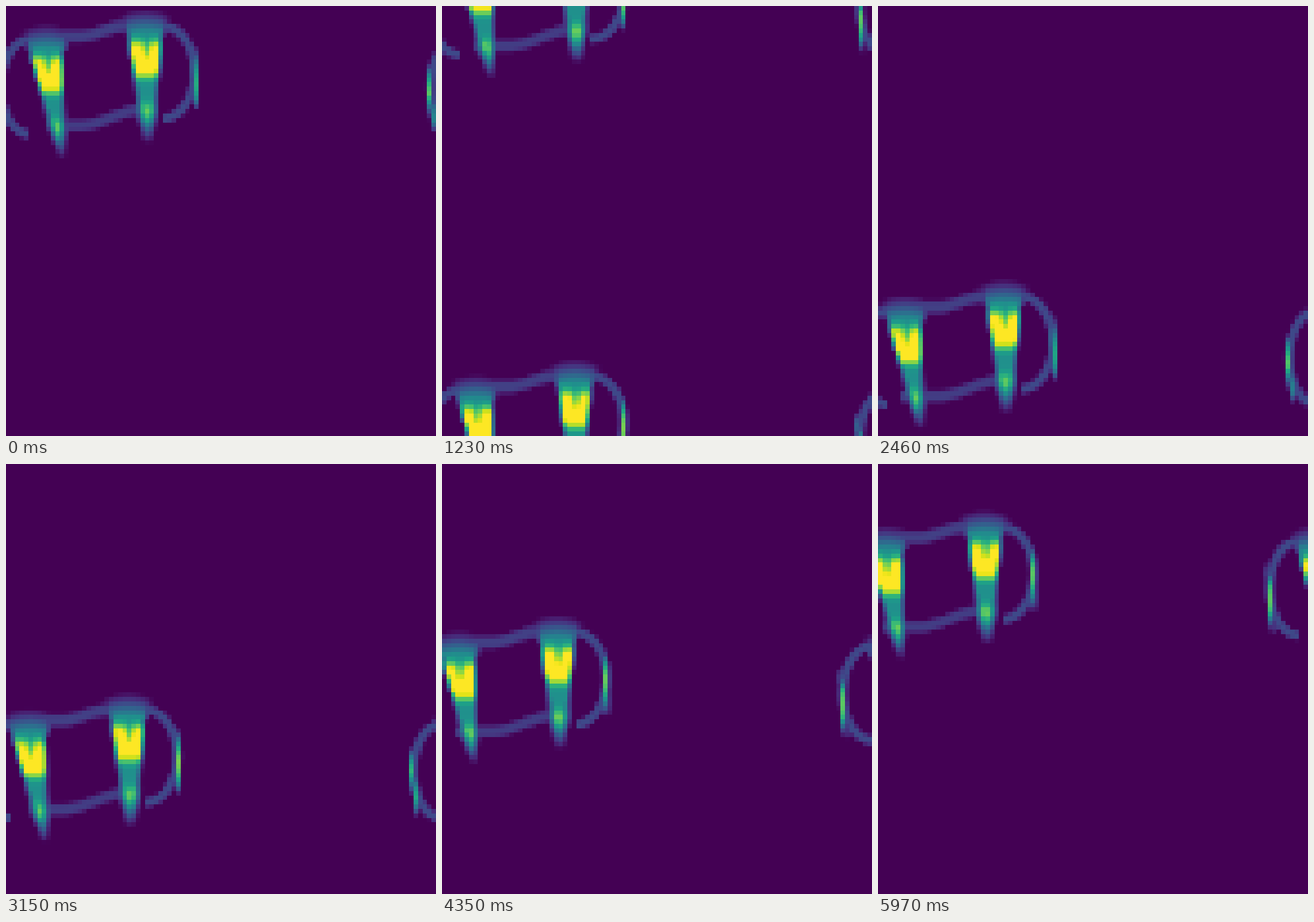
Recreate the animation shown at these times as a matplotlib script. Size 748 by 748 pixels, loop 6000 ms.

```python
import numpy as np
import matplotlib.pyplot as plt
from matplotlib.animation import FuncAnimation

SIZE, CELLS, FRAMES, STEP = 748, 96, 200, 30
VX, VY = -0.0368, -0.434  # drift in cells per frame


def unit(t):
    return np.clip(t, 0, 1)


def smooth(t):
    t = unit(t)
    return t * t * (3 - 2 * t)


def bump(t, power=2):
    return np.exp(-np.abs(t) ** power)


def fang(u, v, top, left, right, lean_l, lean_r):
    """Tapering body: domed cap, hot core with a notch, small foot and tail."""
    h = v - top
    mid = (left + right) / 2
    rise = unit((h - .04 * (u - mid) ** 2) / 5.5)
    level = .5 * rise * unit((30.2 - h) / 5)
    level += .62 * bump((h - 11.4) / 4.1, 4) + .27 * bump((h - 23) / 1.8)

    flare = 1.8 * unit(1 - (h / 6.5) ** 2)
    fall = np.maximum(h - 7, 0)
    lo = left + lean_l * fall - flare
    hi = right + lean_r * fall + flare
    soft = 1.4 + 1.6 * unit(1 - h / 7) + .8 * bump((h - 23) / 3)

    level -= .32 * bump(u - mid - .3) * bump((h - 9.3) / 2.2)
    return level * unit((u - lo) / soft + .5) * unit((hi - u) / soft + .5)


def strand(dist, level, width):
    return level * unit(1.1 * (1 - (dist / width) ** 2))


def end_cap(u, v, cx, cy, rx, ry, side):
    """Half an ellipse, open towards the middle of the body."""
    du, dv = (u - cx) / rx, (v - cy) / ry
    r = np.hypot(du, dv) + 1e-9
    dist = (r - 1) * r / np.hypot(du / rx, dv / ry).clip(1e-9)
    return strand(dist, .22, 1.35) * (side * du > 0)


def wall(u, v, x, lean, mid, half, level):
    """Bright stretch of a cap, about one cell wide."""
    dist = np.abs(u - x - lean * (v - mid))
    return level * unit(1 - ((v - mid) / half) ** 2) * unit(1.5 - 2 * dist)


def creature(u, v):
    between = (u > 8) & (u < 31)
    upper = 6.3 - 2.3 * smooth((u - 16) / 10)
    lower = 26.2 - 3.6 * smooth((u - 16) / 14)
    parts = [
        fang(u, v, 3.5, 5, 12.15, .28, .02),
        fang(u, v, 0, 27, 34.2, .14, -.09),
        strand(v - upper, .19, 1.8) * between,
        strand(v - lower, .18, 1.7) * between,
        end_cap(u, v, 4.8, 17.6, 6.5, 10.5, -1),
        end_cap(u, v, 34.5, 14.3, 7.1, 10.3, 1),
        wall(u, v, -1.67, .08, 20, 8, .75),
        wall(u, v, 41.62, .02, 15.5, 7.5, .8),
    ]
    return np.max(parts, axis=0)


def field(n):
    x, y = VX * n, VY * n
    cols = int(np.floor(x)) + np.arange(-5, 48)
    rows = int(np.floor(y)) + np.arange(-2, 38)
    u, v = np.meshgrid(cols - x, rows - y)
    grid = np.zeros((CELLS, CELLS))
    grid[np.ix_(rows % CELLS, cols % CELLS)] = unit(creature(u, v))
    return grid


fig = plt.figure(figsize=(SIZE / 100, SIZE / 100), dpi=100)
ax = fig.add_axes([0, 0, 1, 1])
ax.axis("off")
img = ax.imshow(field(0), cmap="viridis", vmin=0, vmax=1,
                interpolation="nearest", aspect="auto")


def update(n):
    img.set_data(field(n))
    return [img]


anim = FuncAnimation(fig, update, frames=FRAMES, interval=STEP,
                     repeat=True, repeat_delay=0)
plt.show()
```
